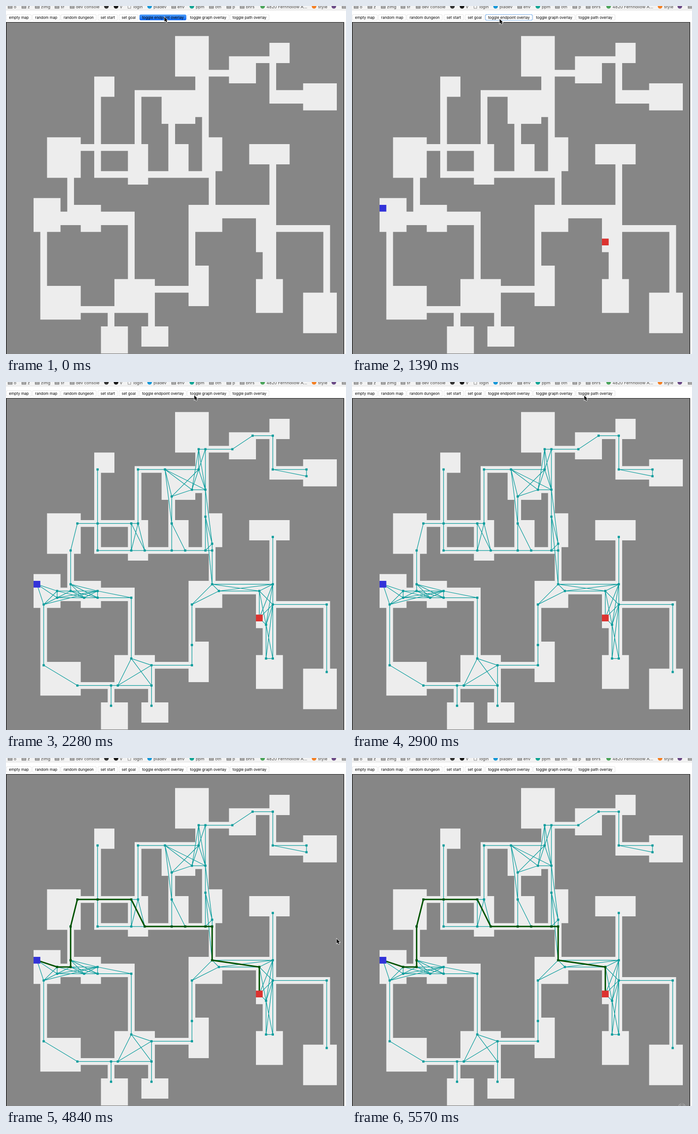
Write an HTML page with a canvas that moves like this. It is 740 px wide and 756 px high and loops after 5670 ms.

```html
<!DOCTYPE html>
<html lang="en">
<head>
<meta charset="utf-8">
<title>Dungeon path finder</title>
<style>
html, body { margin: 0; width: 100%; height: 100%; overflow: hidden; background: #fff; }
canvas { display: block; }
</style>
</head>
<body>
<canvas id="stage" width="740" height="756"></canvas>
<script>
const ctx = document.getElementById('stage').getContext('2d');
const LOOP = 5670, CELL = 44 / 3, LEFT = 4 / 3, TOP = 36, SIZE = 50;
const TEAL = '#099c9c', GREEN = '#005200';

// Rooms: left, top, width, height in cells
const rooms = [
  [25, 2, 5, 6], [33, 5, 4, 4], [39, 3, 3, 3], [44, 9, 5, 4], [13, 8, 3, 3], [23, 11, 5, 4],
  [29, 17, 3, 5], [24, 18, 3, 4], [18, 18, 3, 6], [6, 17, 5, 6], [36, 18, 6, 3],
  [4, 26, 4, 5], [11, 27, 3, 4], [27, 27, 5, 4], [37, 29, 3, 5], [27, 36, 3, 6],
  [37, 38, 4, 5], [44, 40, 5, 6], [5, 39, 6, 5], [16, 38, 6, 5], [14, 45, 4, 4], [20, 45, 4, 3]
];

// Halls run sideways from the first cell, then up or down to the second.
const halls = [
  [35, 7, 29, 22], [28, 7, 28, 13], [28, 10, 19, 18], [24, 14, 24, 22], [13, 22, 30, 27],
  [13, 10, 13, 22], [19, 18, 9, 28], [7, 28, 18, 38], [7, 29, 18, 29], [9, 27, 11, 27],
  [5, 30, 5, 39], [10, 42, 15, 45], [27, 39, 21, 45], [27, 27, 27, 36], [31, 28, 39, 20],
  [31, 27, 39, 38], [38, 33, 38, 38], [39, 30, 47, 40], [36, 5, 39, 11], [39, 10, 44, 11],
  [39, 11, 44, 11]
];
const start = [4, 27], goal = [37, 32];

const strip = (ax, ay, bx, by) =>
  [Math.min(ax, bx), Math.min(ay, by), Math.abs(bx - ax) + 1, Math.abs(by - ay) + 1];
const areas = rooms.concat(...halls.map(([ax, ay, bx, by]) =>
  [strip(ax, ay, bx, ay), strip(bx, ay, bx, by)]));

const floor = new Set();
for (const [l, t, w, h] of areas)
  for (let y = t; y < t + h; y++)
    for (let x = l; x < l + w; x++) floor.add(y * SIZE + x);
const free = (x, y) => floor.has(Math.floor(y) * SIZE + Math.floor(x));

// A waypoint sits diagonally next to every wall corner that can be walked around.
function findNodes() {
  const found = [];
  for (let y = 0; y < SIZE; y++)
    for (let x = 0; x < SIZE; x++) {
      const turns = [[-1, -1], [1, -1], [-1, 1], [1, 1]].some(([dx, dy]) =>
        free(x + dx, y) && free(x, y + dy) && !free(x + dx, y + dy));
      if (free(x, y) && turns) found.push([x, y]);
    }
  return found;
}

const nodes = findNodes();
const ends = [start, goal, ...nodes];
const dist = (a, b) => Math.hypot(b[0] - a[0], b[1] - a[1]);

// True if the straight way from a to b runs over another waypoint.
function passesNode(a, b) {
  const len = dist(a, b), ux = (b[0] - a[0]) / len, uy = (b[1] - a[1]) / len;
  return ends.some(n => {
    const dx = n[0] - a[0], dy = n[1] - a[1], along = dx * ux + dy * uy;
    return n !== a && n !== b && along > 0 && along < len &&
      Math.abs(dx * uy - dy * ux) < 0.46;
  });
}

function sees(a, b) {
  if (passesNode(a, b)) return false;
  const steps = Math.ceil(dist(a, b) * 80), e = 0.01;
  for (let i = 0; i <= steps; i++) {
    const x = a[0] + 0.5 + (b[0] - a[0]) * i / steps;
    const y = a[1] + 0.5 + (b[1] - a[1]) * i / steps;
    if (!free(x - e, y - e) || !free(x + e, y - e) ||
        !free(x - e, y + e) || !free(x + e, y + e)) return false;
  }
  return true;
}

const edges = [];
ends.forEach((a, i) => {
  for (const b of ends.slice(i + 1)) if (sees(a, b)) edges.push([a, b]);
});

function shortestPath() {
  const cost = new Map([[start, 0]]), from = new Map();
  for (let changed = true; changed;) {
    changed = false;
    for (const [p, q] of edges)
      for (const [a, b] of [[p, q], [q, p]]) {
        const c = (cost.get(a) ?? Infinity) + dist(a, b);
        if (c < (cost.get(b) ?? Infinity) - 1e-9) {
          cost.set(b, c);
          from.set(b, a);
          changed = true;
        }
      }
  }
  const way = [];
  for (let n = goal; n; n = from.get(n)) way.push(n);
  return way;
}
const path = shortestPath();

const px = x => LEFT + x * CELL;
const py = y => TOP + y * CELL;

function box(x, y, w, h, color) {
  ctx.fillStyle = color;
  ctx.fillRect(x, y, w, h);
}

function trace(points) {
  points.forEach(([x, y], i) =>
    ctx[i ? 'lineTo' : 'moveTo'](px(x + 0.5), py(y + 0.5)));
}

function strokeLines(lines, width, color) {
  ctx.strokeStyle = color;
  ctx.lineWidth = width;
  ctx.beginPath();
  lines.forEach(trace);
  ctx.stroke();
}

function marks(points, size, color) {
  for (const [x, y] of points)
    box(px(x + 0.5) - size / 2, py(y + 0.5) - size / 2, size, size, color);
}

function setFont(size) {
  ctx.font = size + 'px Inter, "Open Sans", sans-serif';
}

const icons = {
  folder(x) {
    box(x - 13, -3, 10, 8.5, '#777');
    box(x - 12, -1, 8, 5.5, '#a9a9a9');
  },
  page(x) {
    box(x - 12, -4, 7, 9.5, '#888');
    box(x - 11, -4, 5, 8.5, '#fff');
  }
};

function drawIcon(icon, x) {
  if (icons[icon]) return icons[icon](x);
  ctx.fillStyle = icon;
  ctx.beginPath();
  ctx.arc(x - 8.5, 0.8, 5, 0, 7);
  ctx.fill();
}

const bookmarks = [['o', 17], ['z', 47], ['zimg', 76], ['sf', 119], ['dev console', 152],
  ['', 227, '#333'], ['v', 248, '#181818'], ['login', 277, 'page'], ['pladev', 321, '#1798d8'],
  ['env', 373], ['ppm', 413, '#12a594'], ['oth', 455], ['p', 493], ['bnrs', 522],
  ['4820 Fernhollow A...', 567, '#4aa45a'], ['style', 679, '#f48024'], ['', 722, '#6b4a86'],
  ['', 744]];

function drawBookmarks() {
  box(0, 0, 740, 9, '#f3f3f3');
  box(0, 8.5, 740, 0.8, '#d5d5d5');
  setFont(9);
  ctx.textAlign = 'left';
  for (const [text, x, icon = 'folder'] of bookmarks) {
    drawIcon(icon, x);
    ctx.fillStyle = '#484848';
    ctx.fillText(text, x, 4.8);
  }
}

// Label and centre
const buttons = [['empty map', 28], ['random map', 87.5], ['random dungeon', 158],
  ['set start', 221.5], ['set goal', 267], ['toggle endpoint overlay', 341.5],
  ['toggle graph overlay', 440], ['toggle path overlay', 530]];

function drawButton([text, mid], pressed, focused) {
  setFont(8.15);
  const w = ctx.measureText(text).width + 11.5, l = mid - w / 2;
  const fill = (grow, color) => {
    ctx.fillStyle = color;
    ctx.beginPath();
    ctx.roundRect(l - grow, 18.5 - grow, w + grow * 2, 12.5 + grow * 2, 3);
    ctx.fill();
  };
  if (pressed) {
    const blue = ctx.createLinearGradient(0, 18, 0, 31);
    blue.addColorStop(0, '#4d9df8');
    blue.addColorStop(1, '#0c66f2');
    fill(0, blue);
  } else {
    fill(focused ? 0.6 : 0.3, focused ? '#7db1ea' : '#e2e2e2');
    fill(-0.5, '#fff');
  }
  ctx.fillStyle = '#000';
  ctx.textAlign = 'center';
  ctx.fillText(text, mid, 27.8);
}

function drawMap() {
  box(0, 35, 736, 721, '#111');
  box(1.2, 36, 733.6, 720, '#868686');
  ctx.fillStyle = '#ededed';
  ctx.beginPath();
  for (const [l, t, w, h] of areas) ctx.rect(px(l), py(t), w * CELL, h * CELL);
  ctx.fill();
}

function drawCursor(x, y) {
  ctx.beginPath();
  [[0, 0], [0, 10], [2.3, 8], [4, 11.7], [5.8, 10.9], [4.2, 7.2], [7.2, 7.2]]
    .forEach(([dx, dy]) => ctx.lineTo(x + dx, y + dy));
  ctx.closePath();
  ctx.strokeStyle = '#fff';
  ctx.lineWidth = 1.5;
  ctx.stroke();
  ctx.fillStyle = '#000';
  ctx.fill();
}

function drawRing(x, y) {
  ctx.beginPath();
  ctx.arc(x, y, 6.3, 0, 7);
  ctx.strokeStyle = 'rgba(255,255,255,0.75)';
  ctx.lineWidth = 2.6;
  ctx.stroke();
  ctx.strokeStyle = '#222';
  ctx.lineWidth = 1;
  ctx.stroke();
}

// The pointer jumps: time and tip, hidden where there is no tip.
const moves = [[0, 344.8, 24], [140, 294, 28], [350, 309.8, 28], [500, 318.5, 28],
  [1390, 321.3, 28.3], [1540, 397.8, 28.5], [1690, 409.8, 29], [2580, 422.8, 30.2],
  [2760, 491.8, 30], [2900, 505.5, 29.5], [4840, 719.6, 392.8], [4980], [5130, 730, 745],
  [5270, 710, 745], [5570]];
const clicks = [[650, 321, 27.5], [2130, 411, 29.7], [3490, 507, 29], [5570, 718, 758]];
const SHOW_ENDS = 790, SHOW_GRAPH = 2280, SHOW_PATH = 3490, PRESS_GRAPH = 2130;

function draw(t) {
  box(0, 0, 740, 756, '#fff');
  drawBookmarks();
  buttons.forEach((button, i) => {
    const pressed = (i === 5 && t < SHOW_ENDS) ||
      (i === 6 && t >= PRESS_GRAPH && t < SHOW_GRAPH);
    drawButton(button, pressed, i === 5 && t < PRESS_GRAPH);
  });
  drawMap();
  if (t >= SHOW_GRAPH) {
    strokeLines(edges, 1.25, TEAL);
    marks(nodes, 4.8, TEAL);
  }
  if (t >= SHOW_PATH) {
    strokeLines([path], 3, GREEN);
    marks(path, 4.6, GREEN);
  }
  if (t >= SHOW_ENDS) {
    marks([start], CELL, '#3333d9');
    marks([goal], CELL, '#dc3330');
  }
  for (const [at, x, y] of clicks) if (t >= at && t < at + 145) drawRing(x, y);
  const [, x, y] = moves.filter(m => m[0] <= t).pop();
  if (x !== undefined) drawCursor(x, y);
}

const began = performance.now();
function tick() {
  draw((performance.now() - began) % LOOP);
  requestAnimationFrame(tick);
}
tick();
</script>
</body>
</html>
```
